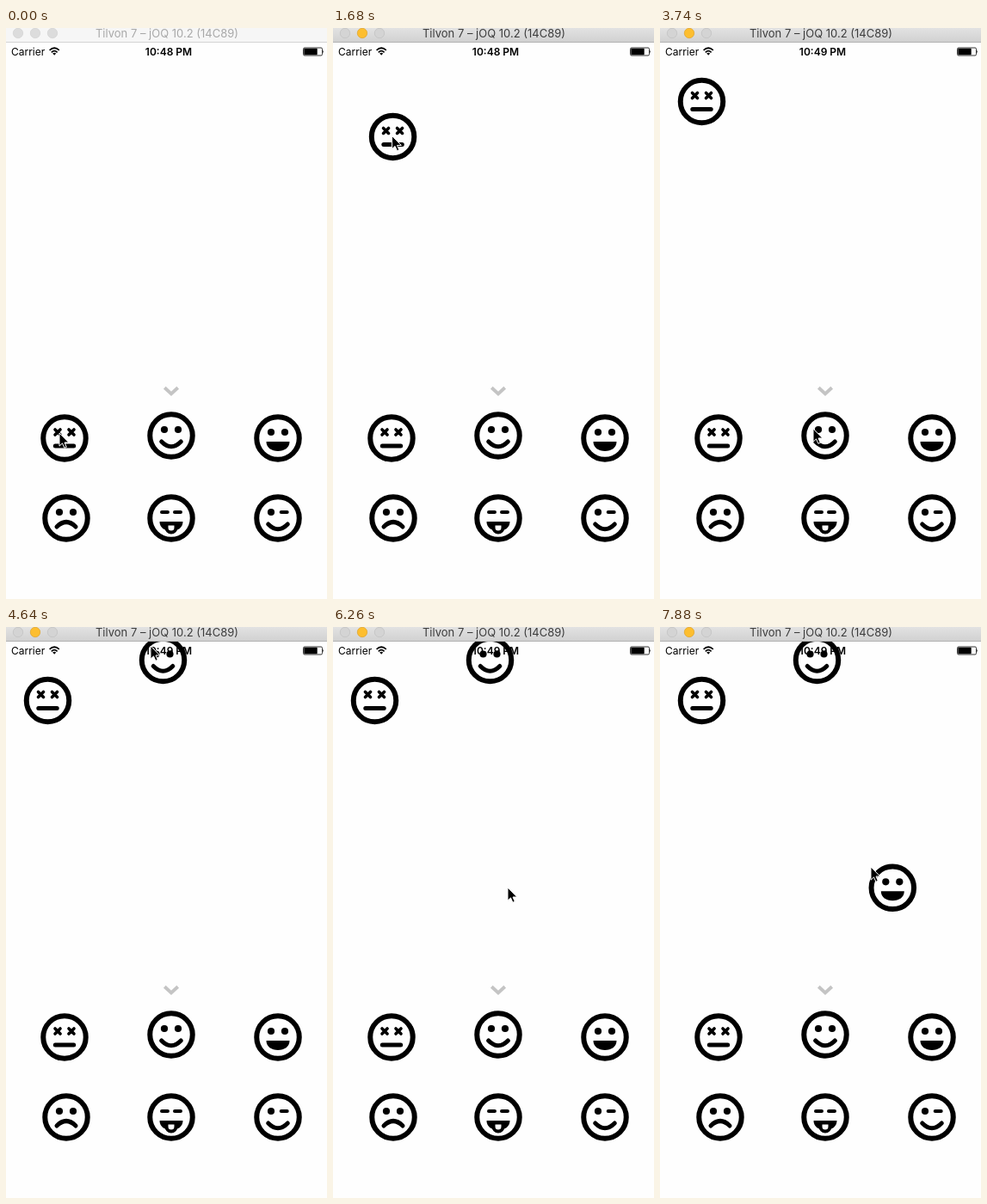
An HTML page that plays this animation: 373 by 664 pixels, repeating every 8000 ms.

```html
<!DOCTYPE html>
<html lang="en">
<head>
<meta charset="utf-8">
<title>Dragging faces</title>
<style>
  html, body { margin: 0; width: 100%; height: 100%; overflow: hidden; background: #fefefe; }
  svg { display: block; width: 373px; height: 664px; }
  text { font-family: Inter, Roboto, sans-serif; font-size: 12px; }
  .line { fill: none; stroke: #000; stroke-width: 5; stroke-linecap: round; }
  .thin { stroke-width: 4.2; }
  .cross { stroke-width: 3.6; }
  #title text { font-size: 13px; fill: #a8a8a8; text-anchor: middle; }
  #title .bar { fill: #f6f6f6; }
  #title .edge { fill: #d3d3d3; }
  #title circle { fill: #dcdcdc; stroke: #d2d2d2; stroke-width: .7; }
  #title.active text { fill: #3c3c3c; }
  #title.active .bar { fill: url(#chrome); }
  #title.active .edge { fill: #b2b2b2; }
  #title.active circle { fill: #d4d4d4; stroke: #c1c1c1; }
  #title.active .amber { fill: #fdbe2f; stroke: #e0a327; }
</style>
</head>
<body>
<svg viewBox="0 0 373 664">
  <defs>
    <linearGradient id="chrome" x2="0" y2="1">
      <stop stop-color="#e2e2e2"/><stop offset="1" stop-color="#d0d0d0"/>
    </linearGradient>
    <linearGradient id="frost">
      <stop offset=".3" stop-color="#999"/>
      <stop offset=".44" stop-color="#6c6c6c"/>
      <stop offset=".54" stop-color="#6c6c6c"/>
      <stop offset=".68" stop-color="#999"/>
    </linearGradient>

    <circle id="ring" r="24.75" fill="none" stroke="#000" stroke-width="6"/>
    <circle id="eye" r="4.1"/>
    <path id="dash" class="line thin" d="M-3.4 0H3.4"/>
    <path id="cross" class="line cross" d="M-3-3 3 3M3-3-3 3"/>
    <path id="grinMouth" d="M-13.5 4H13.5C13.5 11 7.5 15 0 15S-13.5 11-13.5 4Z"/>
    <path id="smileMouth" class="line" d="M-11.3 7Q0 18.5 11.3 7"/>
    <g id="eyes"><use href="#eye" x="-8" y="-7"/><use href="#eye" x="8" y="-7"/></g>

    <g id="dead">
      <use href="#ring"/><use href="#cross" x="-8" y="-7"/><use href="#cross" x="8" y="-7"/>
      <path class="line" d="M-10.7 9H10.7"/>
    </g>
    <g id="smile"><use href="#ring"/><use href="#eyes"/><use href="#smileMouth"/></g>
    <g id="grin"><use href="#ring"/><use href="#eyes"/><use href="#grinMouth"/></g>
    <g id="sad">
      <use href="#ring"/><use href="#eyes"/><path class="line" d="M-11 10Q0-1 11 10"/>
    </g>
    <g id="tongue">
      <use href="#ring"/><use href="#dash" x="-7.5" y="-7"/><use href="#dash" x="7.5" y="-7"/>
      <use href="#grinMouth"/>
      <path d="M-5.5 6.5H5.5V11A5.5 5.5 0 0 1-5.5 11Z" fill="#fefefe" stroke="#000" stroke-width="4"/>
    </g>
    <g id="wink">
      <use href="#ring"/><use href="#eye" x="-8" y="-7"/><use href="#dash" x="7.2" y="-7"/>
      <use href="#smileMouth"/>
    </g>
  </defs>

  <rect width="373" height="664" fill="#fefefe"/>

  <path d="M184.3 418.3 192 425.4 199.7 418.3" fill="none" stroke="#c4c4c4" stroke-width="4"/>
  <use href="#dead" x="68" y="477"/>
  <use href="#smile" x="192" y="474"/>
  <use href="#grin" x="316" y="477"/>
  <use href="#sad" x="70" y="570"/>
  <use href="#tongue" x="192" y="570"/>
  <use href="#wink" x="316" y="570"/>

  <g id="copies"></g>

  <g id="status">
    <text x="6" y="31.5">Carrier</text>
    <path d="M50.6 25.9Q56.2 20.6 61.8 25.9M52.8 28.3Q56.2 25.1 59.6 28.3" fill="none" stroke="#000" stroke-width="1.7"/>
    <path d="M54.2 29.6Q56.2 27.9 58.2 29.6L56.2 31.7Z"/>
    <text id="clock" x="189" y="31.5" text-anchor="middle" font-weight="600">10:48 PM</text>
    <rect x="345.5" y="23" width="22" height="9" rx="1.5" fill="none" stroke="#000" stroke-width=".8"/>
    <rect x="346.3" y="23.8" width="15.4" height="7.4" rx=".6"/>
    <path d="M368.4 25.7q1.6 1.8 0 3.6Z"/>
  </g>

  <g id="panel">
    <rect y="-648" width="373" height="648" fill="url(#frost)"/>
    <rect x="169" y="-20" width="37" height="5.5" rx="2.7" fill="#ebebeb"/>
  </g>

  <g id="title">
    <rect class="bar" width="373" height="17"/>
    <rect class="edge" y="16" width="373" height="1"/>
    <circle cx="14" cy="6" r="5.7"/>
    <circle class="amber" cx="34" cy="6" r="5.7"/>
    <circle cx="54" cy="6" r="5.7"/>
    <text x="187" y="11">Tilvon 7 – jOQ 10.2 (14C89)</text>
  </g>

  <path id="cursor" d="M0 0V15.2L3.5 11.9 5.9 17.3 8.3 16.3 6 11H10.8Z" stroke="#fff" stroke-linejoin="round"/>
</svg>

<script>
  // The picture advances in ticks, as a screen recording does.
  const LOOP = 8000, START = 499, TICK = 147.2;
  const BAR = 17;
  const $ = id => document.getElementById(id);

  // Where the pointer tip arrives at each tick; "rest" is how long it stays there.
  const stops = [
    { at: 0, x: 62, y: 471 },
    { at: 4, x: 66, y: 485 },               // press the dead face
    { at: 7, x: 75, y: 138 },
    { at: 15, x: 47.5, y: 84.5, rest: 1 },  // drop it
    { at: 22, x: 178, y: 466, rest: 1 },    // press the smile
    { at: 28, x: 168, y: 22 },              // drop it
    { at: 30, x: 115, y: 10 },
    { at: 32, x: 115, y: 57 },              // pull the panel down
    { at: 34, x: 115, y: 12 },              // push it back
    { at: 39, x: 203, y: 303 },
    { at: 43, x: 190, y: 553 },
    { at: 47, x: 293, y: 462, rest: 1 },    // press the grin
    { at: 49, x: 270, y: 441 },
    { at: 50, x: 245, y: 279 }
  ];

  const panelPull = { from: 30, to: 34, grip: 8 };

  const drags = [
    { face: 'dead', grab: 4, drop: 15, dx: 1, dy: 1 },
    { face: 'smile', grab: 23, drop: 28, dx: 14.5, dy: 16.5 },
    { face: 'grin', grab: 48, drop: 50, dx: 25.3, dy: 24.3 }
  ];
  for (const drag of drags) {
    drag.node = document.createElementNS('http://www.w3.org/2000/svg', 'use');
    drag.node.setAttribute('href', '#' + drag.face);
    $('copies').append(drag.node);
  }

  const easeOut = p => 1 - (1 - p) ** 2;

  function pointerAt(tick) {
    const next = stops.findIndex(stop => stop.at > tick);
    if (next < 0) return stops[stops.length - 1];
    if (next === 0) return stops[0];
    const a = stops[next - 1], b = stops[next];
    const leave = a.at + (a.rest || 0);
    const p = easeOut(Math.max(0, (tick - leave) / (b.at - leave)));
    return { x: a.x + (b.x - a.x) * p, y: a.y + (b.y - a.y) * p };
  }

  const place = (node, x, y) => node.setAttribute('transform', `translate(${x} ${y})`);
  const show = (node, visible) => { node.style.display = visible ? '' : 'none'; };

  function draw(time) {
    const tick = Math.floor((time - START) / TICK);
    const tip = pointerAt(tick);
    const pulling = tick > panelPull.from && tick < panelPull.to;

    place($('cursor'), tip.x, tip.y);
    place($('panel'), 0, pulling ? tip.y + panelPull.grip : BAR);
    show($('status'), !pulling);
    $('title').classList.toggle('active', tick >= 3);
    $('clock').textContent = tick < 19 ? '10:48 PM' : '10:49 PM';

    for (const { node, grab, drop, dx, dy } of drags) {
      const held = pointerAt(Math.min(tick, drop));
      show(node, tick > grab);
      place(node, held.x + dx, held.y + dy);
    }
  }

  const origin = performance.now();
  function frame() {
    draw((performance.now() - origin) % LOOP);
    requestAnimationFrame(frame);
  }
  frame();
</script>
</body>
</html>
```
